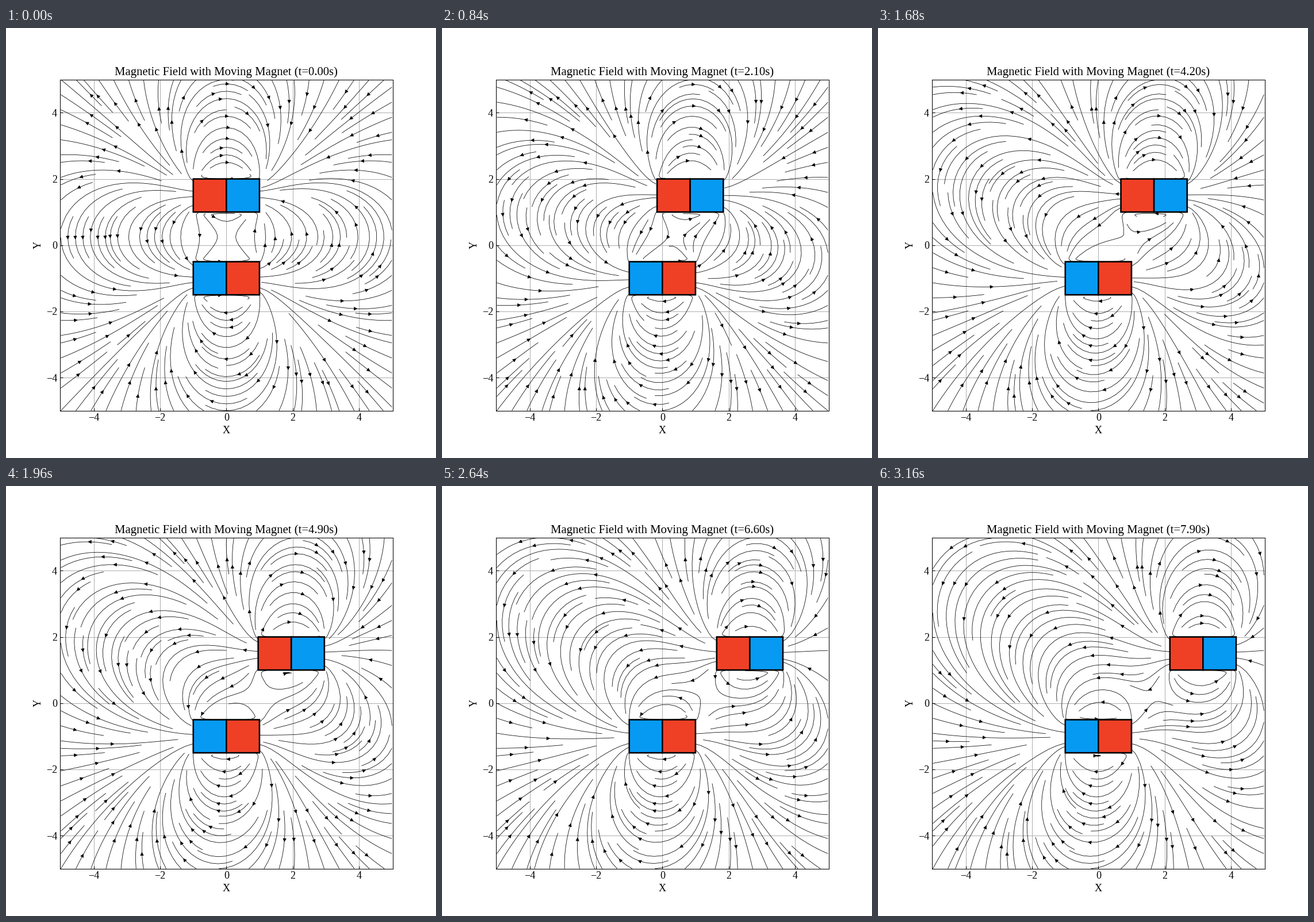
Animation, 748 px wide and 748 px high, one loop 3200 ms. Source, as a matplotlib script:

```python
import math

import numpy as np
import matplotlib.pyplot as plt
from matplotlib.animation import FuncAnimation
from matplotlib.collections import LineCollection, PolyCollection
from matplotlib.patches import Rectangle

FRAMES, INTERVAL = 80, 40
DPI = 93.5
N = 101                       # field samples per axis
CELLS = 45                    # streamline spacing mask per axis
LAST = N - 1
TO_MASK = (CELLS - 1) / LAST
MAX_STEP, MAX_ERROR = 1 / CELLS, 0.003
MAX_LENGTH, MIN_LENGTH = 2.0, 0.1
LINE_WIDTH = 0.6
POINT = DPI / 72 / (8 * DPI * 0.77 / 10)   # one typographic point in data units
TINY = 1e-9
RED, BLUE = "xkcd:tomato", "xkcd:azure"

plt.rcParams.update({
    "font.family": "Liberation Serif",
    "font.size": 14,
    "axes.titlesize": 16,
    "xtick.direction": "in",
    "ytick.direction": "in",
})

axis = np.linspace(-5, 5, N)
GX, GY = np.meshgrid(axis, axis)


def magnet_field(cx, cy, sign):
    """In-plane field of a 2 x 1 x 1 block magnetised along x."""
    # pull samples inwards a little so that surface points count as inside
    px, py = (GX - cx) * (1 - TINY), (GY - cy) * (1 - TINY)
    u, v = np.zeros_like(GX), np.zeros_like(GX)
    for side in (1, -1):
        x = px - side
        for edge in (1, -1):
            y = py + edge / 2
            q = sign * side * edge
            u += q * np.arctan(y / 2 / (x * np.sqrt(x * x + y * y + 0.25)))
            v -= q * np.arcsinh(0.5 / np.hypot(x, y))
    inside = (abs(px) < 1) & (abs(py) < 0.5)
    u += 2 * math.pi * sign * inside
    # the field is singular on the corners
    corner = (abs(abs(px) - 1) < 2 * TINY) & (abs(abs(py) - 0.5) < 2 * TINY)
    u[corner] = v[corner] = 0
    return u, v


def spiral(n):
    """Cells of an n x n grid from the border inwards."""
    x0, y0, x1, y1 = 0, 1, n - 1, n - 1
    x = y = 0
    heading = "right"
    for _ in range(n * n):
        yield x, y
        if heading == "right":
            x += 1
            if x >= x1:
                x1 -= 1
                heading = "up"
        elif heading == "up":
            y += 1
            if y >= y1:
                y1 -= 1
                heading = "left"
        elif heading == "left":
            x -= 1
            if x <= x0:
                x0 += 1
                heading = "down"
        else:
            y -= 1
            if y <= y0:
                y0 += 1
                heading = "right"


SEEDS = list(spiral(CELLS))


def make_direction(u, v):
    """Bilinear lookup of the flow direction, in grid steps per unit length."""
    U, V, S = (np.pad(a, (0, 1), mode="edge").tolist()
               for a in (u * LAST, v * LAST, np.hypot(u, v)))

    def direction(x, y):
        if not (0 <= x <= LAST and 0 <= y <= LAST):
            return None
        i, j = int(x), int(y)
        a, b = x - i, y - j
        w11 = a * b
        w01, w10 = a - w11, b - w11
        w00 = 1 - a - w10
        k, m = i + 1, j + 1
        p, q = S[j], S[m]
        s = p[i] * w00 + p[k] * w01 + q[i] * w10 + q[k] * w11
        p, q = U[j], U[m]
        fx = p[i] * w00 + p[k] * w01 + q[i] * w10 + q[k] * w11
        p, q = V[j], V[m]
        fy = p[i] * w00 + p[k] * w01 + q[i] * w10 + q[k] * w11
        return fx / s, fy / s

    return direction


def run_to_border(path, k, sign):
    x, y = path[-1]
    cx, cy = sign * k[0], sign * k[1]

    def reach(p, c):
        if c == 0:
            return math.inf
        return -p / c if c < 0 else (LAST - p) / c

    ds = min(reach(x, cx), reach(y, cy))
    path.append((x + cx * ds, y + cy * ds))
    return ds


def streamlines(u, v):
    """Evenly spaced streamlines, at most one per mask cell."""
    direction = make_direction(u, v)
    taken = [[False] * CELLS for _ in range(CELLS)]
    current = None
    visited = []

    def enter(cell):
        nonlocal current
        if cell == current:
            return True
        x, y = cell
        if taken[y][x]:
            return False
        taken[y][x] = True
        visited.append(cell)
        current = cell
        return True

    def trace(x, y, sign):
        ds, total, path = MAX_STEP, 0.0, []
        while True:
            path.append((x, y))
            k1 = direction(x, y)
            h = sign * ds
            dx1, dy1 = h * k1[0], h * k1[1]
            k2 = direction(x + dx1, y + dy1)
            if k2 is None:
                total += run_to_border(path, k1, sign)
                break
            dx = 0.5 * (dx1 + h * k2[0])
            dy = 0.5 * (dy1 + h * k2[1])
            error = math.hypot(dx - dx1, dy - dy1) / LAST
            if error < MAX_ERROR:
                x += dx
                y += dy
                if not (0 <= x <= LAST and 0 <= y <= LAST):
                    break
                if not enter((round(x * TO_MASK), round(y * TO_MASK))):
                    break
                if total + ds > MAX_LENGTH:
                    break
                total += ds
            if error == 0:
                ds = MAX_STEP
            else:
                ds = min(MAX_STEP, 0.85 * ds * math.sqrt(MAX_ERROR / error))
        return total, path

    lines = []
    for seed in SEEDS:
        sx, sy = seed
        if taken[sy][sx]:
            continue
        visited.clear()
        enter(seed)
        x, y = min(sx / TO_MASK, LAST), min(sy / TO_MASK, LAST)
        back, tail = trace(x, y, -1)
        current = seed
        ahead, head = trace(x, y, 1)
        if back + ahead > MIN_LENGTH:
            lines.append(np.array(tail[::-1] + head[1:]) * (10 / LAST) - 5)
        else:
            for cx, cy in visited:
                taken[cy][cx] = False
    return lines


def arrow_head(line):
    """Triangle pointing along the line at half its length."""
    step = np.diff(line, axis=0)
    if len(step) == 0:
        return None
    s = np.cumsum(np.hypot(step[:, 0], step[:, 1]))
    n = np.searchsorted(s, s[-1] / 2)
    half = step[n] / 2
    size = math.hypot(*half)
    if size == 0:
        return None
    d = half / size
    normal = np.array([-d[1], d[0]])
    # long segments pull the tip back by two points
    pull = 2 if size > 4 * POINT else 0
    pull += 0.5 * LINE_WIDTH * math.sqrt(5)
    tip = line[n] + half - pull * POINT * d
    base = tip - 4 * POINT * d
    side = 2 * POINT * normal
    return np.array([base + side, tip, base - side])


fig = plt.figure(figsize=(8, 8), dpi=DPI, facecolor="white")
ax = fig.add_axes([0.125, 0.11, 0.775, 0.77])
half_width = 5 * 0.775 / 0.77
ax.set_xlim(-half_width, half_width)
ax.set_ylim(-5, 5)
ticks = range(-4, 5, 2)
ax.set_xticks(ticks)
ax.set_yticks(ticks)
ax.set_xlabel("X")
ax.set_ylabel("Y")
ax.grid(True)
title = ax.set_title("")

flow = LineCollection([], colors="black", linewidths=LINE_WIDTH, zorder=2)
heads = PolyCollection([], facecolors="black", edgecolors="black",
                       linewidths=LINE_WIDTH, joinstyle="round", zorder=2)
ax.add_collection(flow, autolim=False)
ax.add_collection(heads, autolim=False)


def add_magnet(cx, cy, left, right):
    parts = [Rectangle((cx + dx, cy - 0.5), 1, 1, facecolor=color, snap=False,
                       edgecolor="black", linewidth=2, zorder=3)
             for dx, color in ((-1, left), (0, right))]
    for part in parts:
        ax.add_patch(part)
    return parts


moving = add_magnet(0, 1.5, RED, BLUE)
add_magnet(0, -1, BLUE, RED)
FIXED_U, FIXED_V = magnet_field(0, -1, 1)


def update(i):
    t = i / 10
    cx = 0.4 * t
    moving[0].set_x(cx - 1)
    moving[1].set_x(cx)
    u, v = magnet_field(cx, 1.5, -1)
    lines = streamlines(u + FIXED_U, v + FIXED_V)
    flow.set_segments(lines)
    heads.set_verts([h for h in map(arrow_head, lines) if h is not None])
    title.set_text(f"Magnetic Field with Moving Magnet (t={t:.2f}s)")
    return flow, heads, title, *moving


anim = FuncAnimation(fig, update, frames=FRAMES, interval=INTERVAL,
                     repeat=True, repeat_delay=0, blit=False)
plt.show()
```
